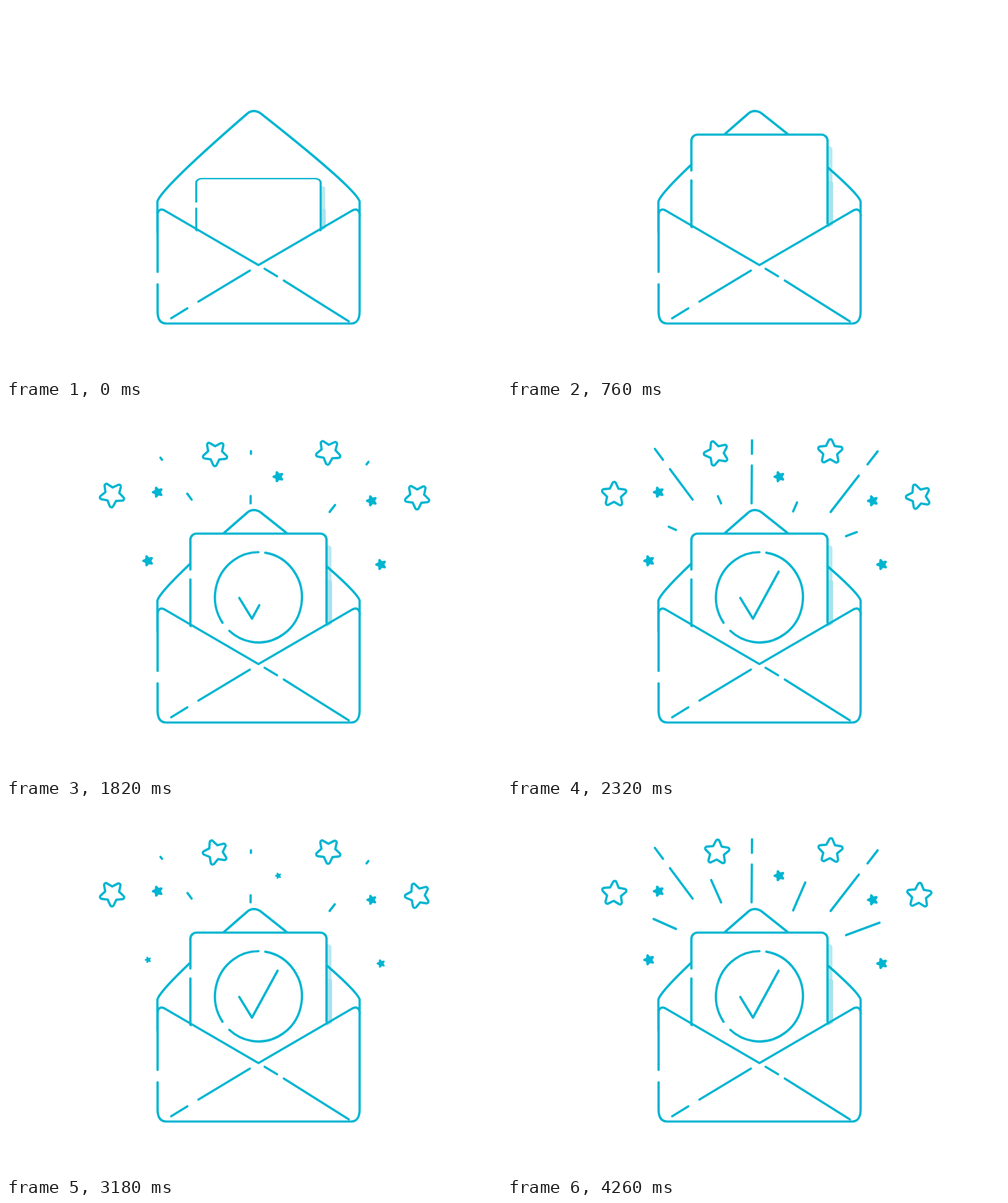
These frames come from a looping animation (800 by 600 pixels, 4.82 s). An HTML page with a canvas:

```html
<!DOCTYPE html>
<html lang="en">
<head>
<meta charset="utf-8">
<title>Opening envelope</title>
<style>
html, body { margin: 0; width: 100%; height: 100%; overflow: hidden; background: #fff; }
canvas { display: block; }
</style>
</head>
<body>
<canvas id="stage" width="800" height="600"></canvas>
<script>
const ctx = document.getElementById('stage').getContext('2d');
const LOOP = 4820, INK = '#00b5d1', TAU = Math.PI * 2, DEG = Math.PI / 180;

const clamp = (v, max = 1) => Math.min(max, Math.max(0, v));
// Eased rise from 0 to 1 between two times.
function ramp(t, from, to) {
  const u = clamp((t - from) / (to - from));
  return u * u * (3 - 2 * u);
}
// Smooth wave: 0 at even, 1 at odd numbers of half periods.
const wave = n => (1 - Math.cos(Math.PI * n)) / 2;

const flap = new Path2D(`M244.7 366V316C250 300 300 252 390 174
  C396 168.5 405 168.5 412 174C520 259 567 303 571.5 316V340`);
const pocket = new Path2D(`M245 430V338C245 331 249.5 327 256 330.5L408 419L560 330.5
  C567 327 571.5 331 571.5 338V494C571.5 507 566 513.5 558 513.5H259
  C250 513.5 245 507 245 494V450`);
const seams = new Path2D('M394 428L311 478M293 489L267 505M418 425L438 437M449 444L554 510');
const pocketFill = new Path2D('M245 330L408 419L571 330V513H245Z');
const card = new Path2D('M298 266V218A10 10 0 0 1 308 208H508A10 10 0 0 1 518 218V352M298 282V368');
const cardFill = new Path2D('M298 368V218A10 10 0 0 1 308 208H508A10 10 0 0 1 518 218V368Z');
const check = new Path2D('M377 312L397.5 345.5L439 269.5');

// Rays run outward: start and end point.
const longRays = [[300, 153, 239, 71], [395.3, 159, 396, 57], [523, 173, 599, 75]];
const shortRays = [[273, 202, 237, 186], [346, 159, 330, 123], [462.5, 172, 482, 127], [548, 212, 602, 192]];

// Stars: resting point and the way flown to reach it.
const bigStars = [[173, 147.4, -57, -58], [339.4, 80.6, 0, -79], [522.4, 78.4, 51, -130], [666, 150.6, 89, -69]];
const smallStars = [[245, 141, -68, -68], [440, 116, 34, -102], [591, 155, 92, -60], [229.5, 252, -68, -34], [606, 258, 92, -31]];

function starPath(outer, inner, round, lift = 0) {
  const path = new Path2D();
  const at = (r, a) => [r * Math.sin(a), -r * Math.cos(a) - lift];
  path.moveTo(...at(inner, -TAU / 10));
  for (let i = 0; i < 5; i++) {
    const next = at(inner, (i + 0.5) * TAU / 5);
    path.arcTo(...at(outer, i * TAU / 5), ...next, round);
    path.lineTo(...next);
  }
  path.closePath();
  return path;
}
const bigShape = starPath(24.5, 11.8, 3, 2.6);
const smallShape = starPath(10.1, 4.4, 1);

function drawStar(t, [x, y, dx, dy], shape, turn, size, solid) {
  const left = 1 - ramp(t, 1160, 1660);
  size *= ramp(t, 1160, 1360);
  if (size < 0.02) return;
  ctx.save();
  ctx.translate(x - dx * left, y - dy * left);
  ctx.rotate(turn * DEG);
  ctx.scale(size, size);
  if (solid) {
    ctx.fillStyle = INK;
    ctx.fill(shape);
    ctx.lineWidth = 2;
  }
  ctx.stroke(shape);
  ctx.restore();
}

function drawStars(t) {
  bigStars.forEach((star, i) => {
    const rock = wave(clamp((t - 1690 - i % 2 * 310) / 745, 3));
    drawStar(t, star, bigShape, -35 + 38 * rock, 1, false);
  });
  smallStars.forEach((star, i) => {
    const start = i % 2 ? 2345 : 3160 - 32 * i;
    const dip = wave(clamp((t - start) / 520, 2));
    drawStar(t, star, smallShape, -18, clamp(1 - 1.3 * dip), true);
  });
}

// Draws the stretch of every ray between two fractions, grown by p.
function drawRays(rays, p, from = 0, to = 1) {
  if (p <= 0) return;
  const end = from + (to - from) * p;
  ctx.beginPath();
  for (const [x, y, ex, ey] of rays) {
    ctx.moveTo(x + (ex - x) * from, y + (ey - y) * from);
    ctx.lineTo(x + (ex - x) * end, y + (ey - y) * end);
  }
  ctx.stroke();
}

function drawAllRays(t) {
  const long = ramp(t, 1680, 2180) - ramp(t, 2760, 3340) + ramp(t, 3340, 3700);
  const short = ramp(t, 2200, 2520) - ramp(t, 2680, 3000) + ramp(t, 3400, 3720);
  drawRays(longRays, long, 0, 0.6);
  drawRays(longRays, long, 0.785, 1);
  drawRays(shortRays, short);
}

// Runs a drawing step in the space of the rising, growing card.
function onCard(t, step) {
  const grow = ramp(t, 0, 740);
  ctx.save();
  ctx.translate(408, 374 - 29 * ramp(t, 0, 400) + 9 * ramp(t, 400, 740));
  ctx.scale(0.914 + 0.086 * grow, 0.65 + 0.35 * grow);
  ctx.translate(-408, -354);
  step();
  ctx.restore();
}

function drawShadow() {
  ctx.fillStyle = '#b9e9f1';
  ctx.beginPath();
  ctx.roundRect(516, 227, 10, 60, [0, 5, 0, 0]);
  ctx.fill();
  ctx.fillStyle = '#a6e3ed';
  ctx.beginPath();
  ctx.roundRect(516, 283, 11, 80, [0, 4, 0, 0]);
  ctx.fill();
}

function drawCard() {
  ctx.fillStyle = '#fff';
  ctx.fill(cardFill);
  ctx.stroke(card);
}

// Arc angles are measured clockwise from the top.
function drawArc(from, to, p) {
  ctx.beginPath();
  ctx.ellipse(408, 311, 70.3, 73, 0, (from - 90) * DEG, (from + (to - from) * p - 90) * DEG);
  ctx.stroke();
}

function drawBadge(t) {
  const ring = ramp(t, 1160, 1630), tick = ramp(t, 1640, 2000);
  if (ring > 0) {
    drawArc(9, 222, ring);
    drawArc(235.7, 360, ring);
  }
  if (tick > 0) {
    ctx.setLineDash([127 * tick, 200]);
    ctx.stroke(check);
    ctx.setLineDash([]);
  }
}

function draw(t) {
  ctx.fillStyle = '#fff';
  ctx.fillRect(0, 0, 800, 600);
  ctx.strokeStyle = INK;
  ctx.lineWidth = 3.7;
  ctx.lineCap = ctx.lineJoin = 'round';

  onCard(t, drawShadow);
  ctx.stroke(flap);
  drawAllRays(t);
  drawStars(t);
  onCard(t, drawCard);
  ctx.fillStyle = '#fff';
  ctx.fill(pocketFill);
  drawBadge(t);
  ctx.stroke(pocket);
  ctx.stroke(seams);
}

const start = performance.now();
function frame() {
  draw((performance.now() - start) % LOOP);
  requestAnimationFrame(frame);
}
frame();
</script>
</body>
</html>
```
